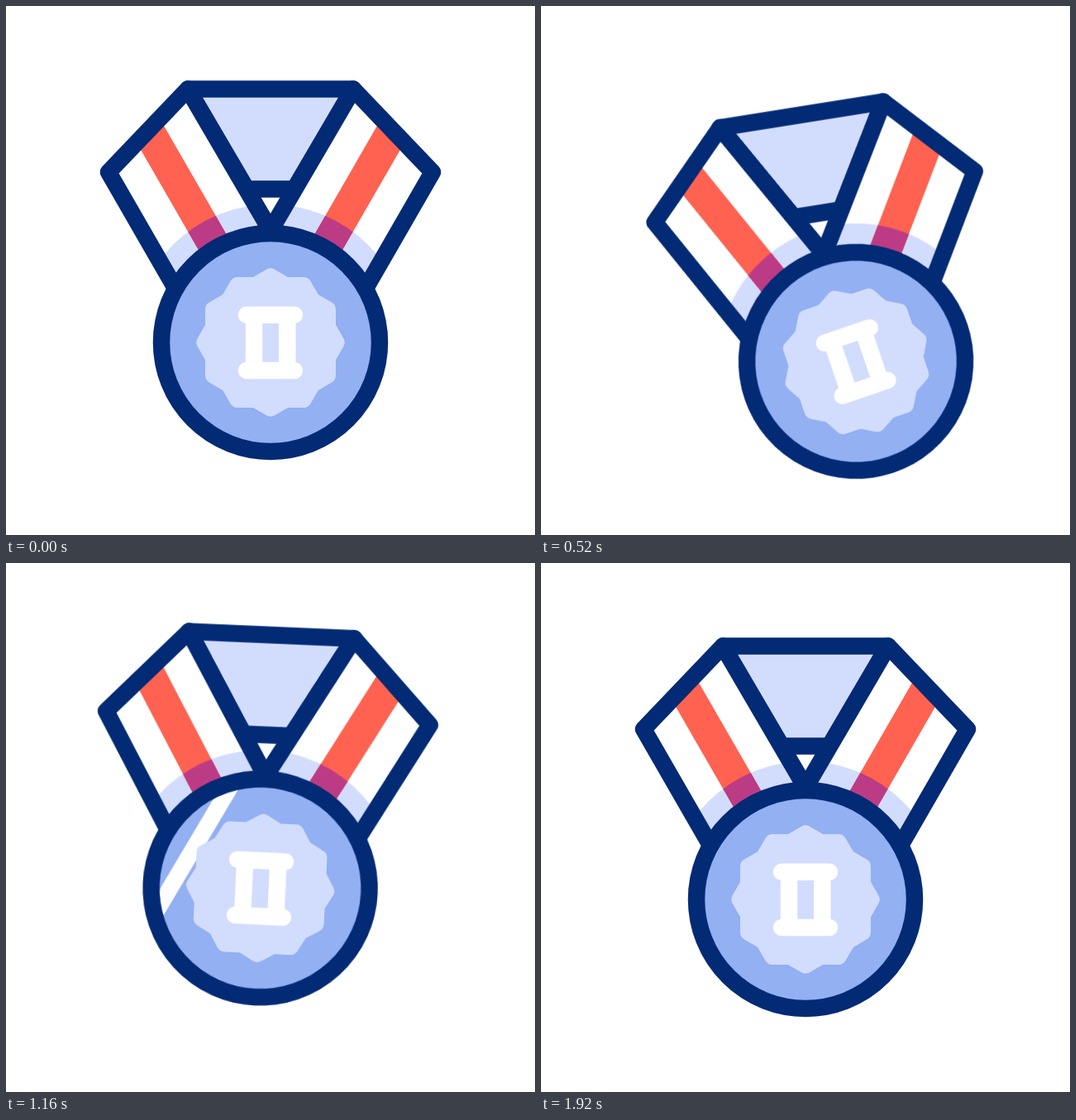
Write an HTML page that moves like this. It is 640 by 640 pixels and loops after 2 s.

```html
<!DOCTYPE html>
<html lang="en">
<head>
<meta charset="utf-8">
<title>Silver medal</title>
<style>
  html, body { margin: 0; width: 100%; height: 100%; overflow: hidden; background: #fff; }
  svg { display: block; width: 100%; height: 100%; }

  .line { stroke: #032a75; stroke-width: 20.5; stroke-linejoin: round; }
  .pale { fill: #d2dcfd; }
  .white { fill: #fff; }
  .red { fill: #ff6250; }
  .plum { fill: #bc3b85; }
  .blue { fill: #92b0f2; }
  .hex { fill: #d2dcfd; stroke: #d2dcfd; stroke-width: 20; stroke-linejoin: round; }
  .numeral { fill: none; stroke: #fff; stroke-width: 20.5; stroke-linecap: round; }

  .bob, .tilt, .swing, .shine { animation: 2s ease-in-out infinite; }
  .bob { animation-name: bob; }
  .tilt { animation-name: tilt; transform-origin: 320px 130px; }
  .swing { animation-name: swing; transform-origin: 320px 301px; }
  .shine { animation-name: shine; }

  @keyframes bob {
    0% { transform: translateY(0); }
    28% { transform: translateY(31px); }
    46% { transform: translateY(-30.5px); }
    68.5%, 100% { transform: translateY(0); }
  }
  @keyframes tilt {
    0%, 7% { transform: rotate(0deg); }
    29.5%, 45% { transform: rotate(-9.5deg); }
    64.5% { transform: rotate(6deg); }
    92.5%, 100% { transform: rotate(0deg); }
  }
  @keyframes swing {
    0% { transform: rotate(0deg); }
    8% { transform: rotate(0deg); animation-timing-function: cubic-bezier(.6, 0, .9, .55); }
    26% { transform: rotate(-9.6deg); animation-timing-function: cubic-bezier(.3, .4, .6, 1); }
    36% { transform: rotate(-30.5deg); animation-timing-function: cubic-bezier(.2, 0, .7, .75); }
    58% { transform: rotate(.2deg); animation-timing-function: cubic-bezier(.3, .45, .6, 1); }
    72% { transform: rotate(11.3deg); }
    96%, 100% { transform: rotate(0deg); }
  }
  @keyframes shine {
    0%, 52% { transform: translateX(-134px); }
    74.5%, 100% { transform: translateX(134px); }
  }
</style>
</head>
<body>
<svg viewBox="0 0 640 640">
  <defs>
    <path id="legs" d="M220 100.5 124 201 253 425H320V271.5Z M420 100.5 516 201 387 425H320V271.5Z"/>
    <path id="stripes" d="M157 163.6 185 134.6 338 400H293.4Z M483 163.6 455 134.6 302 400H346.6Z"/>
    <path id="hexagon" d="M320 327.3 389 367.2V446.8L320 486.7 251 446.8V367.2Z"/>
    <clipPath id="inLegs"><use href="#legs"/></clipPath>
    <clipPath id="inStripes"><use href="#stripes"/></clipPath>
    <clipPath id="inDisc"><circle cx="320" cy="407" r="124"/></clipPath>
  </defs>

  <g class="bob">
    <g class="tilt">
      <path class="line pale" d="M220 100.5H420L349 221.5H291Z"/>

      <!-- ribbon, with the halo of the disc falling on it -->
      <use href="#legs" class="white"/>
      <g clip-path="url(#inLegs)"><circle class="swing pale" cx="320" cy="407" r="167"/></g>
      <use href="#stripes" class="red"/>
      <g clip-path="url(#inStripes)"><circle class="swing plum" cx="320" cy="407" r="167"/></g>
      <use href="#legs" class="line" fill="none"/>

      <g class="swing">
        <circle class="blue" cx="320" cy="407" r="132"/>
        <g clip-path="url(#inDisc)">
          <g transform="rotate(28 320 407)">
            <rect class="shine white" x="310" y="265" width="20" height="284"/>
          </g>
        </g>
        <circle class="line" fill="none" cx="320" cy="407" r="132"/>
        <use href="#hexagon" class="hex"/>
        <use href="#hexagon" class="hex" transform="rotate(30 320 407)"/>
        <path class="numeral" d="M291 373.7H349M291 441H349M300 374V441M340.3 374V441"/>
      </g>
    </g>
  </g>
</svg>
</body>
</html>
```
